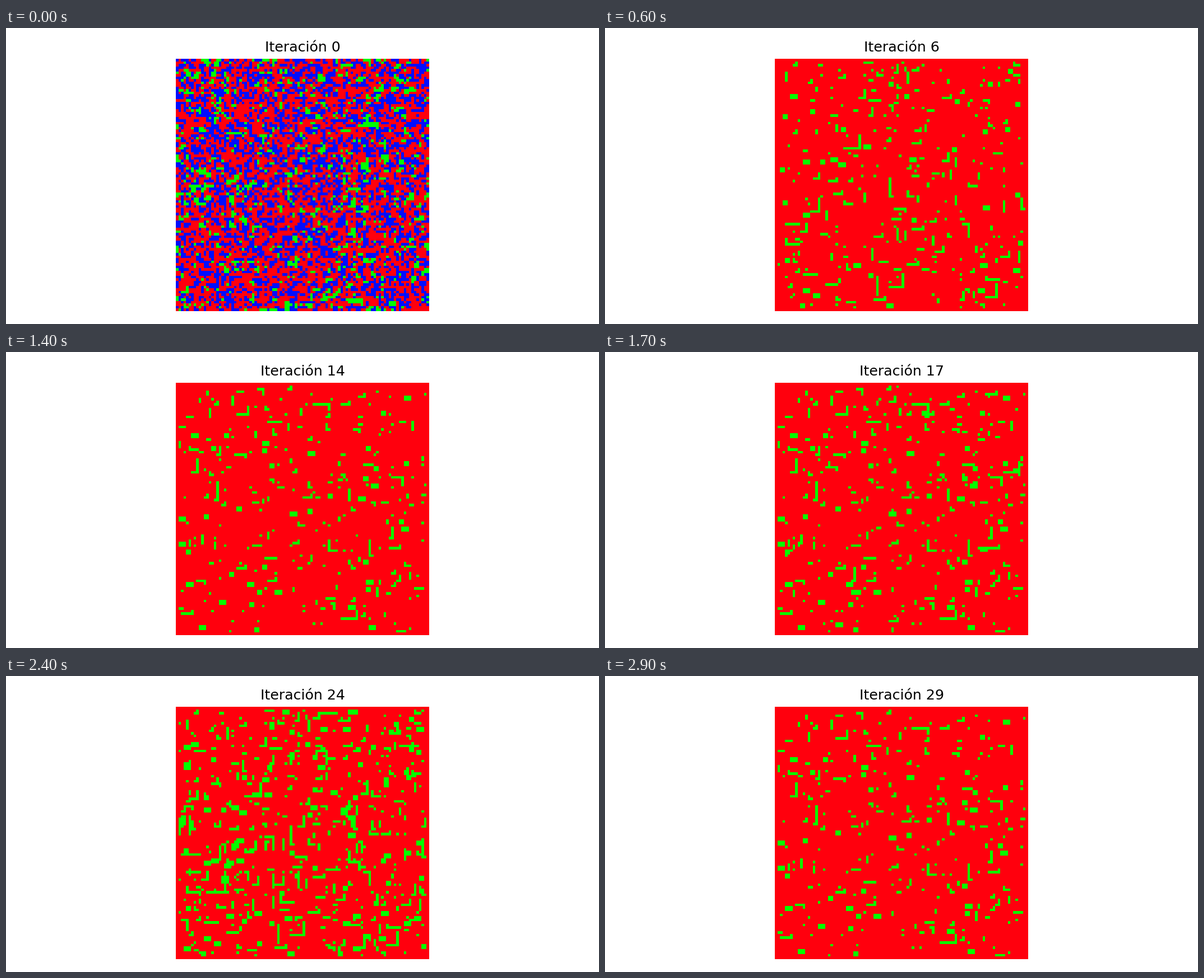
Write a matplotlib script that moves like this. It is 1058 px wide and 529 px high and loops after 3000 ms.

```python
import numpy as np
import matplotlib.pyplot as plt
from matplotlib.animation import FuncAnimation
from matplotlib.colors import ListedColormap

W, H, N = 1058, 529, 100
STEPS, INTERVAL = 30, 100
RED, GREEN, BLUE = range(3)
COLORS = ["#ff000d", "#00ff00", "#000dff"]

# Lasting and passing shapes for each phase of the three-step cycle
LASTING = (280, 310, 260)
PASSING = (220, 120, 150)


def stroke(rng):
    """Offsets of a short line that may bend once at a right angle."""
    step = np.eye(2, dtype=int)[rng.integers(2)]
    turn = step[::-1] * rng.choice((-1, 1))
    first = min(1 + rng.geometric(0.45), 8)
    second = min(rng.geometric(0.5) - 1, 5)
    cells = [step * k for k in range(first)]
    return cells + [cells[-1] + turn * k for k in range(1, second + 1)]


def random_shape(rng):
    """Cells of a dot, a small block or a bent stroke."""
    kind = rng.random()
    if kind < 0.36:
        offsets = [(0, 0)]
    elif kind < 0.52:
        offsets = np.ndindex(2, rng.integers(2, 4))
    else:
        offsets = stroke(rng)
    row, col = rng.integers(1, N - 1, 2)
    return [(row + r, col + c) for r, c in offsets]


def inside(cells):
    return all(0 < r < N - 1 and 0 < c < N - 1 for r, c in cells)


def touches(grid, cells):
    return any(grid[r - 1:r + 2, c].any() or grid[r, c - 1:c + 2].any()
               for r, c in cells)


def scatter(count, rng, apart):
    """Mask of random shapes, kept apart or allowed to merge."""
    grid = np.zeros((N, N), bool)
    while count:
        cells = random_shape(rng)
        if inside(cells) and not (apart and touches(grid, cells)):
            for cell in cells:
                grid[cell] = True
            count -= 1
    return grid


def clumped_noise(rng, weight):
    noise = rng.random((N, N))
    around = sum(np.roll(noise, s, axis) for s in (-1, 1) for axis in (0, 1))
    return noise + weight * around


def top_share(field, share):
    return field > np.quantile(field, 1 - share)


def initial_grid(rng):
    grid = np.where(top_share(clumped_noise(rng, 0.12), 0.42), BLUE, RED)
    grid[top_share(clumped_noise(rng, 0.5), 0.11)] = GREEN
    return grid


def build_steps():
    rng = np.random.default_rng(14)
    steps = [initial_grid(rng)]
    lasting = [scatter(count, rng, apart=True) for count in LASTING]
    passing = [scatter(count, rng, apart=False) for count in PASSING]
    # Passing shapes come and go region by region
    region = np.kron(rng.random((10, 10)), np.ones((10, 10)))
    for n in range(1, STEPS):
        active = (n >= 15 + 6 * region) & (n < 25 + 4 * region)
        green = lasting[n % 3] | (passing[n % 3] & active)
        green |= scatter(max(0, 20 * (6 - n)), rng, apart=False)
        steps.append(np.where(green, GREEN, RED))
    return steps


steps = build_steps()
fig = plt.figure(figsize=(W / 100, H / 100), dpi=100, facecolor="white")
ax = fig.add_axes([303 / W, 23 / H, 452 / W, 451 / H])
ax.axis("off")
image = ax.imshow(steps[0], cmap=ListedColormap(COLORS), vmin=RED, vmax=BLUE,
                  interpolation="nearest", aspect="auto")
title = ax.set_title("Iteración 0", fontsize=18.2, pad=9.2,
                     fontname="DejaVu Sans")


def update(n):
    image.set_data(steps[n])
    title.set_text(f"Iteración {n}")
    return image, title


anim = FuncAnimation(fig, update, frames=STEPS, interval=INTERVAL,
                     repeat=True, repeat_delay=0, blit=False)
plt.show()
```
